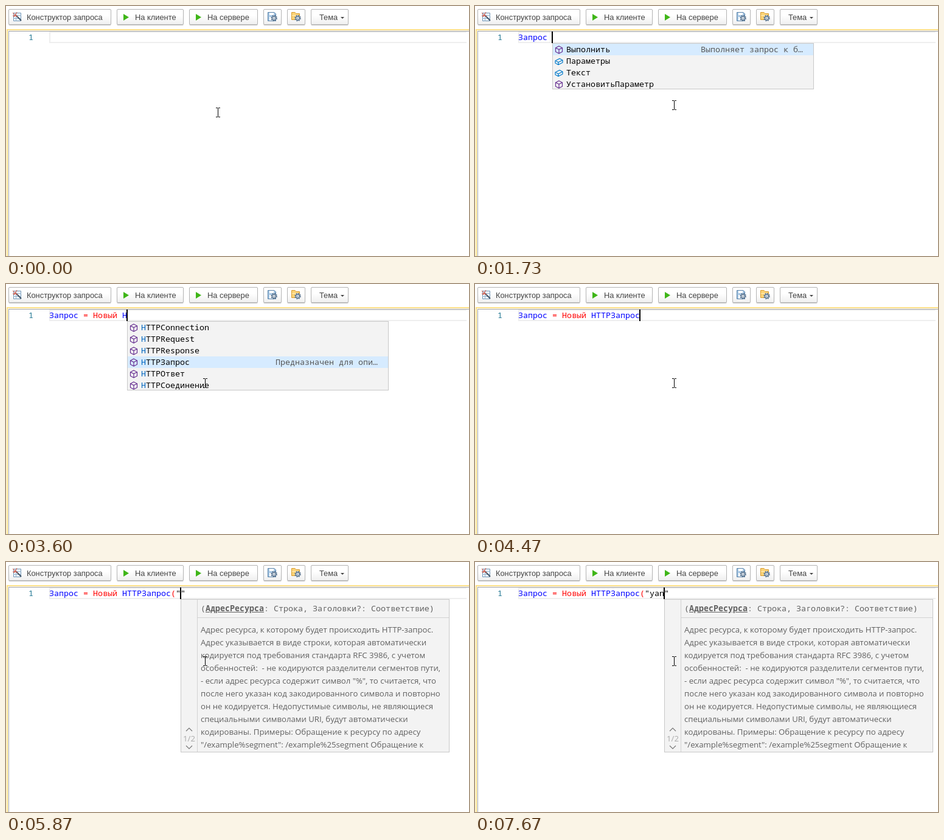
Animation of 761 by 411 pixels, one loop 8000 ms. Source, as an HTML page:

```html
<!DOCTYPE html>
<html lang="ru">
<head>
<meta charset="utf-8">
<style>
  html, body { margin: 0; width: 100%; height: 100%; overflow: hidden; background: #fff; }
  #stage { position: relative; width: 761px; height: 411px; overflow: hidden; }
  #stage div, #stage svg { position: absolute; box-sizing: border-box; }
  .button { top: 5px; height: 26px; border: 1px solid #b3b3b3; border-radius: 2px; box-shadow: 0 1px #c9c9c9;
    background: linear-gradient(#fff 40%, #efefef); font: 12.85px/25px "Liberation Sans", sans-serif;
    color: #444; white-space: pre; }
  .focus { left: 1px; top: 38px; width: 770px; height: 400px; border: 2px solid #fde08a; }
  .editor { left: 4px; top: 41px; width: 770px; height: 400px; border: 1px solid #a0a0a0; }
  .current { left: 71px; top: 42px; width: 686px; height: 19px; border: 2px solid #eee; border-right: 0; }
  .mono { font: 13.333px/18px "Noto Sans Mono", monospace; white-space: pre; }
  .code { left: 71px; top: 42px; color: #00f; }
  .number { left: 37px; top: 42px; color: #237893; }
  .caret { top: 42px; width: 2px; height: 19px; background: #000; }
  .popup { top: 61px; background: #f3f3f3; border: 1px solid #c8c8c8; overflow: hidden; }
  .list { width: 430px; }
  .row { left: 0; width: 428px; height: 19px; color: #000; }
  .row.selected { background: #d6ebff; }
  .row svg { left: 3px; top: 3px; }
  .row div { left: 22px; top: 0; }
  .row .detail { left: auto; right: 17px; color: #555; }
  .row b { color: #0066bf; font-weight: normal; }
  .thumb { right: 0; top: 0; width: 10px; height: 118px; background: #bababa; }
  .hint { width: 442px; height: 252px; color: #616161; }
  .pages { left: 0; top: 0; width: 27px; height: 250px; border-right: 1px solid #d2d2d2; }
  .signature { left: 32px; top: 5px; }
  .signature b { text-decoration: underline; }
  .rule { left: 27px; top: 29px; width: 414px; height: 1px; background: #d2d2d2; }
  .doc, .page { font: 13.2px/21px "Open Sans", sans-serif; white-space: pre; }
  .doc { left: 32px; top: 39px; }
  .page { left: 0; top: 218px; width: 26px; text-align: center; color: #aaa; }
</style>
</head>
<body>
<div id="stage">
  <div class="button" style="left:4px;width:169px;padding-left:29px">Конструктор запроса</div>
  <div class="button" style="left:182px;width:110px;padding-left:29px">На клиенте</div>
  <div class="button" style="left:301px;width:113px;padding-left:29px">На сервере</div>
  <div class="button" style="left:423px;width:30px"></div>
  <div class="button" style="left:462px;width:30px"></div>
  <div class="button" style="left:501px;width:62px;padding-left:13px">Тема</div>
  <svg width="761" height="36" fill="none">
    <defs>
      <g id="gear">
        <circle r="4.2" fill="#fff" stroke="#56728f" stroke-width="2.2" stroke-dasharray="1.8 1.5"/>
        <circle r="3" fill="#fff" stroke="#56728f" stroke-width="1.4"/>
        <circle r="1" fill="#56728f"/>
      </g>
    </defs>
    <g>
      <path d="M12.5 11.5H24.5V24.5H12.5Z" fill="#f4f9fd" stroke="#6d93b5"/>
      <path d="M12 15.5H25M16.5 12V25M12 20.5H25" stroke="#8fb0cc"/>
      <path d="M17 16L25 24" stroke="#456" stroke-width="2"/>
      <path d="M11 11L19 18M18 10L13 18M11 16H18" stroke="#dc4a32"/>
    </g>
    <path d="M193 13L202 18.5 193 24ZM312 13L321 18.5 312 24Z" fill="#3fb618"/>
    <path d="M430.5 10.5H441L443.5 13V24.5H430.5Z" fill="#a9c8e4" stroke="#5580a8"/>
    <path d="M433 11H440V15H433ZM433 18H441V24H433Z" fill="#fff"/>
    <use href="#gear" x="440.5" y="20"/>
    <path d="M469.5 22.5V10.5H475L477 12.5H482.5V22.5Z" fill="#fbd377" stroke="#d69a2c"/>
    <path d="M470 15.5H482" stroke="#fff0c4"/>
    <use href="#gear" x="479.5" y="20"/>
    <path d="M550 18H556L553 21Z" fill="#444"/>
  </svg>
  <div class="focus"></div>
  <div class="editor"></div>
  <div class="current"></div>
  <div class="mono number">1</div>
  <div id="live"></div>
  <svg id="mouse" width="9" height="18" fill="none" stroke="#000">
    <path d="M1 1.5H4M5 1.5H8M4.5 2V16M1 16.5H4M5 16.5H8"/>
  </svg>
</div>
<script>
const LOOP = 8000, CELL = 8, TEXT_LEFT = 71;
const live = document.getElementById('live');
const mouse = document.getElementById('mouse');

const icon = (color, path, extra = '') =>
  `<svg width="14" height="14" fill="none" stroke="${color}" ${extra}><path d="${path}"/></svg>`;
const icons = {
  method: icon('#652d90', 'M7 1L12.5 3.8V10.2L7 13 1.5 10.2V3.8ZM1.5 3.8L7 6.6 12.5 3.8M7 6.6V13', 'stroke-width="1.2"'),
  field: icon('#007acc', 'M1 6L8 2.5 13 5V9L6 12.5 1 10ZM1 6L6 8.5 13 5M6 8.5V12.5', 'stroke-width="1.2"'),
  snippet: icon('#555', 'M1.5 13V1.5H13.5V13') +
    icon('#555', 'M1 13.5H14', 'stroke-dasharray="1 1"')
};

const lists = {
  global: {
    items: ['ЗаблокироватьДанныеДляРе…', 'ЗаблокироватьРаботуПользователя', 'ЗавершитьРаботуСистемы',
      'ЗагрузитьВнешнююКомпоненту', 'ЗакрытьСправку', 'ЗаписатьJSON', 'ЗаписатьXML', 'ЗаписатьДатуJSON',
      'ЗаписьЖурналаРегистрации', 'ЗаполнитьЗначенияСвойств', 'ЗапрещеноОткрытиеФорм', 'Запрос'],
    snippets: ['Запрос'],
    details: { 'ЗаблокироватьДанныеДляРе…': 'Заблокировать данные…' }
  },
  query: {
    items: ['Выполнить', 'Параметры', 'Текст', 'УстановитьПараметр'],
    fields: ['Параметры', 'Текст'],
    details: { 'Выполнить': 'Выполняет запрос к б…' }
  },
  keyword: {
    items: ['Новый', 'Новый объект', 'НомерСеансаИнформационнойБазы', 'НомерСоединенияИнформационнойБазы'],
    snippets: ['Новый', 'Новый объект']
  },
  http: {
    items: ['HTTPConnection', 'HTTPRequest', 'HTTPResponse', 'HTTPЗапрос', 'HTTPОтвет', 'HTTPСоединение'],
    selected: 3,
    details: { 'HTTPЗапрос': 'Предназначен для опи…' }
  }
};

const docs = `Адрес ресурса, к которому будет происходить HTTP-запрос.
Адрес указывается в виде строки, которая автоматически
кодируется под требования стандарта RFC 3986, с учетом
особенностей:  - не кодируются разделители сегментов пути,
- если адрес ресурса содержит символ "%", то считается, что
после него указан код закодированного символа и повторно
он не кодируется. Недопустимые символы, не являющиеся
специальными символами URI, будут автоматически
кодированы. Примеры: Обращение к ресурсу по адресу
"/example%segment": /example%25segment Обращение к`;

// Each step: time, line with "|" as the visible caret, popup, popup column (the caret by default)
const NEW = 'Запрос = Новый', CALL = NEW + ' HTTPЗапрос';
const steps = [
  [0, ''], [400, '|'], [870, ''],
  [1070, 'З|'], [1130, 'З|', 'global'], [1200, 'За|', 'global', 1], [1270, 'За|', 'global'],
  [1330, 'Зап|', 'global'], [1400, 'Запр|', 'global'], [1470, 'Запро|', 'global'], [1530, 'Запрос|', 'global'],
  [1730, 'Запрос |', 'query'], [1870, 'Запрос =|', 'query'], [2000, 'Запрос = |', 'query'],
  [2200, 'Запрос = Н|'], [2400, 'Запрос = Но|', 'keyword'], [2470, 'Запрос = Нов|', 'keyword'],
  [2530, 'Запрос = Новы|', 'keyword', 12], [2600, 'Запрос = Новы|', 'keyword'],
  [3000, NEW + '|'], [3270, NEW + ' |'],
  [3600, NEW + ' H|', 'http'], [3800, NEW + ' HT|', 'http'], [3930, NEW + ' HTT|', 'http'],
  [4400, CALL + '|'], [5000, CALL],
  [5270, CALL + '(|'], [5330, CALL + '(|', 'hint'],
  [5730, CALL + '("|"', 'hint', 26], [5870, CALL + '("|"', 'hint'],
  [6270, CALL + '("н|"', 'hint', 27], [6330, CALL + '("н|"', 'hint'],
  [6530, CALL + '("|"', 'hint'], [7000, CALL + '(""', 'hint', 27],
  [7330, CALL + '("y|"', 'hint', 27], [7400, CALL + '("y|"', 'hint'],
  [7470, CALL + '("ya|"', 'hint', 28], [7530, CALL + '("ya|"', 'hint'],
  [7600, CALL + '("yan|"', 'hint', 29], [7670, CALL + '("yan|"', 'hint']
];

const colorize = line => line.replace(/Новый|[=(]|".*"/g, token =>
  `<span style="color:${token[0] === '"' ? '#000' : '#f00'}">${token}</span>`);

function listHtml(name, left, word) {
  const { items, selected = 0, snippets = [], fields = [], details = {} } = lists[name];
  const shown = items.filter(item => item.startsWith(word));
  const rows = shown.map((item, i) => {
    const kind = snippets.includes(item) ? 'snippet' : fields.includes(item) ? 'field' : 'method';
    const active = i === selected;
    return `<div class="row mono ${active ? 'selected' : ''}" style="left:0;top:${i * 19}px">${icons[kind]}
      <div><b>${word}</b>${item.slice(word.length)}</div>
      ${active ? `<div class="detail">${details[item] || ''}</div>` : ''}</div>`;
  }).join('');
  const thumb = shown.length === 12 ? '<div class="thumb"></div>' : '';
  return `<div class="popup list" style="left:${left}px;height:${shown.length * 19}px">${rows}${thumb}</div>`;
}

const hintHtml = left => `<div class="popup hint" style="left:${left}px">
  <div class="pages"></div><div class="rule"></div>
  <div class="mono signature">(<b>АдресРесурса</b>: Строка, Заголовки?: Соответствие)</div>
  <div class="doc">${docs}</div><div class="page">1/2</div>
  <svg width="26" height="250" fill="none" stroke="#777" stroke-width="1.2"><path d="M8 216L13 211 18 216M8 240L13 245 18 240"/></svg>
</div>`;

function draw([, line, popup, column]) {
  const caret = line.indexOf('|');
  const word = line.split('|')[0].match(/[A-Za-zА-я]*$/)[0];
  const left = TEXT_LEFT + CELL * (column ?? caret);
  let html = `<div class="mono code">${colorize(line.replace('|', ''))}</div>`;
  if (caret >= 0) html += `<div class="caret" style="left:${TEXT_LEFT + CELL * caret - 1}px"></div>`;
  if (popup) html += popup === 'hint' ? hintHtml(left) : listHtml(popup, left, word);
  live.innerHTML = html;
}

let current;
function frame() {
  const time = performance.now() % LOOP;
  const step = steps.findLast(([start]) => start <= time);
  if (step !== current) draw(current = step);
  const [x, y] = time < 70 ? [344, 166] : time < 130 ? [334, 160] : [323, 154];
  mouse.style.left = x + 'px';
  mouse.style.top = y + 'px';
  requestAnimationFrame(frame);
}
frame();
</script>
</body>
</html>
```
